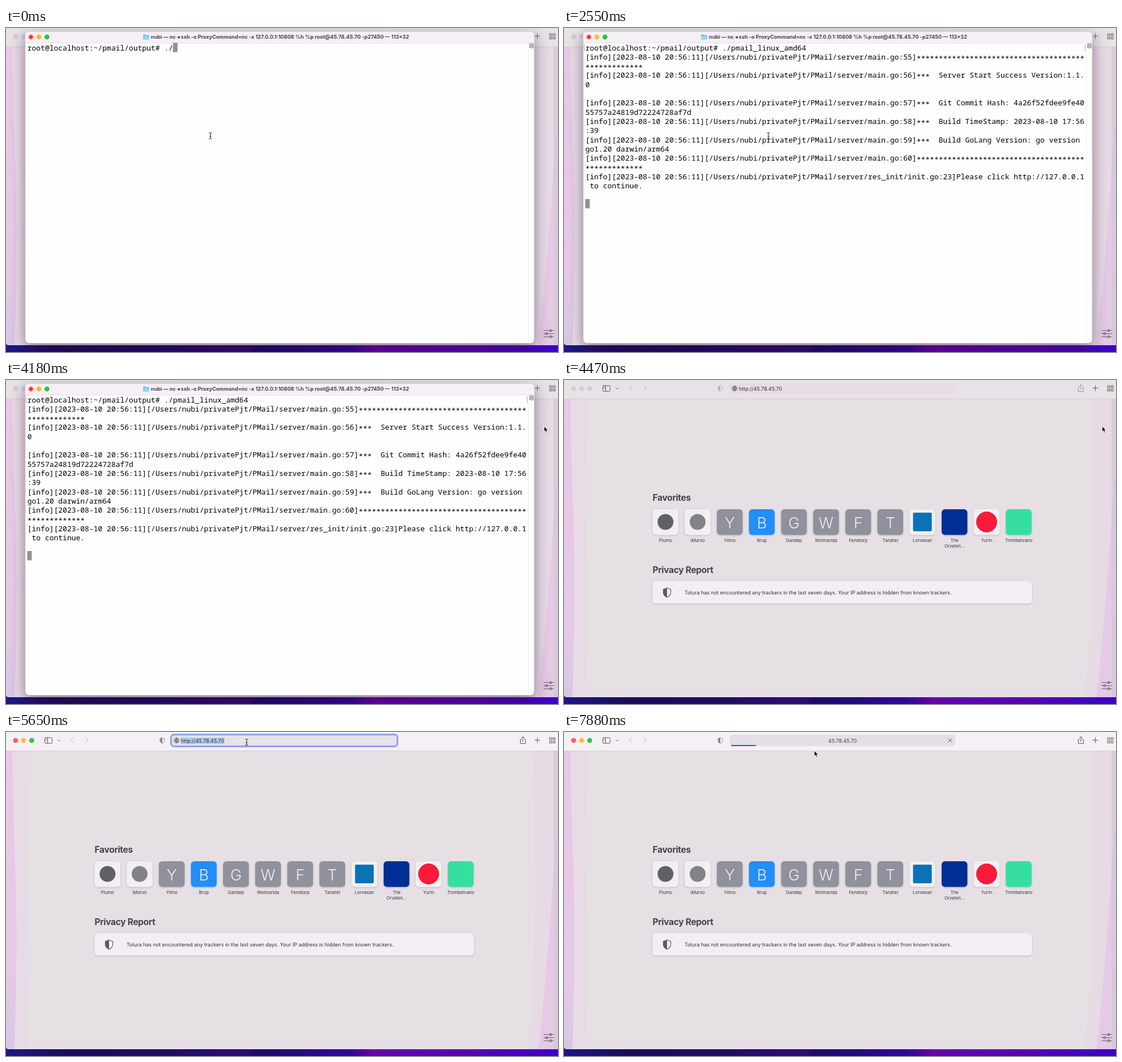
These frames come from a looping animation (975x574 px, 8000 ms). An HTML page:

```html
<!DOCTYPE html>
<html lang="en">
<head>
<meta charset="utf-8">
<style>
  html, body { margin: 0; width: 100%; height: 100%; overflow: hidden; }
  svg { display: block; width: 975px; height: 574px; font-family: Inter, sans-serif; }
  text { white-space: pre; }
  .mono { font: 13px "Noto Sans Mono", monospace; }
  .line { fill: none; stroke: #5c585d; stroke-linecap: round; stroke-linejoin: round; }
  .pale { stroke: #bcb5bc; }
  .heading { font-size: 15.5px; font-weight: 700; letter-spacing: -.3px; fill: #454147; }
  .inactive .light { fill: #d2cbd1; }
  .inactive .soft { opacity: .5; }
</style>
</head>
<body>
<svg viewBox="0 0 975 574">
  <defs>
    <linearGradient id="desk">
      <stop offset="0" stop-color="#1d1785"/><stop offset=".12" stop-color="#1a0b58"/>
      <stop offset=".44" stop-color="#2a0d72"/><stop offset=".45" stop-color="#1c0a66"/>
      <stop offset=".62" stop-color="#30069a"/><stop offset=".67" stop-color="#6402ac"/>
      <stop offset=".85" stop-color="#5602b4"/><stop offset="1" stop-color="#3c04c4"/>
    </linearGradient>
    <linearGradient id="pink" x2="0" y2="1">
      <stop offset="0" stop-color="#e8c8e6"/><stop offset=".75" stop-color="#e5c9e6"/>
      <stop offset="1" stop-color="#d8c6e6"/>
    </linearGradient>
    <filter id="deep" x="-10%" y="-10%" width="120%" height="125%">
      <feDropShadow dx="0" dy="8" stdDeviation="13" flood-color="#2a1030" flood-opacity=".48"/>
    </filter>
    <filter id="glow" x="-20%" y="-20%" width="140%" height="150%">
      <feDropShadow dx="0" dy="1" stdDeviation="1.8" flood-color="#604868" flood-opacity=".3"/>
    </filter>
    <clipPath id="page"><path d="M0 0H975V562H6Q0 562 0 556Z"/></clipPath>
    <path id="shield" d="M0-8 6.5-5.5V0Q6.5 5.5 0 8.5-6.5 5.5-6.5 0V-5.5Z"/>
  </defs>

  <rect width="975" height="574" fill="url(#desk)"/>
  <g id="browser">
    <g clip-path="url(#page)">
      <rect width="975" height="562" fill="#e6e0e5"/>
      <path d="M0 33H45Q37 150 41 300T38 562H0Z" fill="#e7dce6"/>
      <path d="M0 33H11Q13 150 17 260T15 562H0Z" fill="url(#pink)"/>
      <path d="M933 33H975V562H920Q937 400 935 250T933 33Z" fill="#e6dae4"/>
      <path d="M975 130Q964 300 956 400T940 562H975Z" fill="#e5cae6"/>
      <rect x="967" y="33" width="8" height="529" fill="#d5c7d8" opacity=".75"/>
      <rect id="toolbar" width="975" height="33"/>
      <path d="M0 33.5H975" stroke="#d3ccd3"/>
    </g>
    <g>
      <circle class="light" cx="17" cy="15" r="4.4" fill="#fe5f57"/>
      <circle class="light" cx="31" cy="15" r="4.4" fill="#febc2e"/>
      <circle class="light" cx="45.4" cy="15" r="4.4" fill="#28c840"/>
    </g>
    <g class="line">
      <path d="M70 10H80Q81.500 10 81.500 11.500V18.500Q81.500 20 80 20H70Q68.500 20 68.500 18.500V11.500Q68.500 10 70 10ZM73.500 10V20M70.500 12.500H71.500M70.500 14.500H71.500M91.500 14 93.500 16 95.500 14"/>
      <path class="pale" d="M119.500 10.500 115 15 119.500 19.500M140.500 10.500 145 15 140.500 19.500"/>
      <path class="soft" d="M910.500 13H908.500V20.500H917.500V13H915.500M913 17V8.500M910.500 10.500 913 8.300 915.500 10.500"/>
      <path d="M934 14.500H943M938.500 10V19M960.500 10H964V13.500H960.500ZM966.500 10H970V13.500H966.500ZM960.500 16H964V19.500H960.500ZM966.500 16H970V19.500H966.500Z"/>
    </g>
    <g class="soft" transform="translate(276 15) scale(.62)" fill="#8c878d">
      <use href="#shield" fill="none" stroke="#8c878d" stroke-width="1.400"/>
      <path d="M0-8V8.500Q-6.500 5.500-6.500 0V-5.500Z"/>
    </g>

    <rect id="bar" x="293" y="5" width="398" height="20" rx="5"/>
    <rect id="ring" x="291.500" y="4.500" width="400" height="21" rx="5.500" fill="#e7e1e8" stroke="#8aa4ef" stroke-width="3"/>
    <rect id="selection" x="309" y="10" width="77" height="11" fill="#a9cbee"/>
    <g id="address">
      <path class="line" style="stroke-width:.8" d="M297 15A4.300 4.300 0 0 1 305.600 15A4.300 4.300 0 0 1 297 15H305.600M301.300 10.700V19.300M301.300 10.700Q297 15 301.300 19.300Q305.600 15 301.300 10.700M298 12.700H304.600M298 17.300H304.600"/>
      <text x="309" y="18.500" font-size="9" fill="#353137">http://45.78.45.70</text>
    </g>
    <g id="loading">
      <text x="492" y="18.500" font-size="9" fill="#454146" text-anchor="middle">45.78.45.70</text>
      <path class="line" d="M679 12 685 18M685 12 679 18"/>
      <rect id="progress" x="295" y="23" height="2" rx="1" fill="#1664d8"/>
    </g>

    <text class="heading" x="156.500" y="214">Favorites</text>
    <g id="tiles"></g>
    <text class="heading" x="156.500" y="342">Privacy Report</text>
    <rect x="156.500" y="356.500" width="670" height="39.500" rx="6" fill="#f2eff2" filter="url(#glow)"/>
    <g transform="translate(182 376.500)" fill="#5e5a60">
      <use href="#shield" fill="none" stroke="#5e5a60" stroke-width="1.200"/>
      <path d="M0-8V8.500Q-6.500 5.500-6.500 0V-5.500Z"/>
    </g>
    <text x="213" y="380" font-size="9" fill="#343036">Tolura has not encountered any trackers in the last seven days. Your IP address is hidden from known trackers.</text>
    <g class="line" style="stroke-width:1.200" fill="#e6dae4">
      <path d="M950 536H967M950 541.500H967M950 547H967"/>
      <g style="fill:#e6d6e4"><circle cx="962" cy="536" r="1.700"/><circle cx="955" cy="541.500" r="1.700"/><circle cx="962" cy="547" r="1.700"/></g>
    </g>
  </g>

  <g id="terminal">
    <rect x="34" y="6.500" width="899" height="552" rx="7" fill="#fefefe" stroke="#a9a0aa" stroke-width=".5" filter="url(#deep)"/>
    <path d="M34 26.500V13.500Q34 6.500 41 6.500H926Q933 6.500 933 13.500V26.500Z" fill="#f5eff6"/>
    <path d="M34 26.500H933" stroke="#e2dce3"/>
    <path d="M922.500 27V558" stroke="#ececec"/>
    <path d="M925 28H931V35H925ZM926 30.500H930M926 32.500H930" fill="none" stroke="#555" stroke-width=".9"/>
    <circle cx="44" cy="16" r="4.400" fill="#fe5f57"/><circle cx="44" cy="16" r="1.400" fill="#7d1511"/>
    <circle cx="58" cy="16" r="4.400" fill="#febc2e"/><circle cx="72.300" cy="16" r="4.400" fill="#28c840"/>
    <path d="M242 12.500Q242 11.500 243 11.500H246L247 12.500H252Q253 12.500 253 13.500V20.500H242Z" fill="#6fc3ec"/>
    <path d="M242 14.500H253V20.500H242Z" fill="#92d6f6"/>
    <text x="256" y="19.300" font-size="9.100" font-weight="700" fill="#454046">nubi — nc ◂ ssh -o ProxyCommand=nc -x 127.0.0.1:10808 %h %p root@45.78.45.70 -p27450 — 113×32</text>
    <path id="marks" d="M36 29V41M920.500 29V41" stroke="#aaa"/>
    <rect id="caret" width="8" height="16.500" fill="#929292"/>
    <text id="prompt" class="mono" x="37.700" y="39.500"></text>
    <g id="log" class="mono"></g>
  </g>

  <g id="pointer">
    <path id="arrow" d="M0 0V9.800L2.300 7.800 4 11.600 5.700 10.800 4.100 7.200H7.100Z" stroke="#fff" stroke-width=".9"/>
    <path id="beam" d="M-2.500-5.500Q0-5.500 0-4Q0-5.500 2.500-5.500M0-4V4M-2.500 5.500Q0 5.500 0 4Q0 5.500 2.500 5.500M-1.500 1H1.500" fill="none" stroke="#222"/>
  </g>
</svg>
<script>
const $ = id => document.getElementById(id);
const set = (id, attrs) => { for (const k in attrs) $(id).setAttribute(k, attrs[k]); };
const show = (id, on) => { $(id).style.display = on ? '' : 'none'; };

const CELL = 7.8, ROW = 16.3, LOOP = 8000;
const PROMPT = 'root@localhost:~/pmail/output# ';

// Favourites: label, tile colour, then a letter or a plain mark
const GREY = '#90919d', PALE = '#f2eff2';
const favorites = [
  ['Plumo', PALE, '●', '#626064'], ['iMurvo', PALE, '●', '#858287'],
  ['Yilmo', GREY, 'Y'], ['Brup', '#238ef6', 'B'], ['Gandep', GREY, 'G'],
  ['Wolmarida', GREY, 'W'], ['Fendlorp', GREY, 'F'], ['Tandrel', GREY, 'T'],
  ['Lorvexan', PALE, '■', '#0a72b5'], ['The|Orvelen...', '#032d97'],
  ['Yurm', PALE, '●', '#f91b3c'], ['Trombelvano', '#35dfa0']
];
$('tiles').innerHTML = favorites.map(([label, color, sign, ink], i) => {
  const x = 179.3 + 56.72 * i;
  const mark = sign === '●' ? `<circle cx="${x}" cy="251.500" r="${ink === '#f91b3c' ? 18.5 : 14}" fill="${ink}"/>`
    : sign === '■' ? `<rect x="${x - 16.5}" y="235" width="33" height="33" rx="2" fill="${ink}"/>`
    : sign ? `<text x="${x}" y="263" font-size="27" font-weight="300" fill="#f0edf1" text-anchor="middle">${sign}</text>` : '';
  const lines = label.split('|').map((s, n) =>
    `<text x="${x}" y="${287 + 10 * n}" font-size="7.800" fill="#3a363b" text-anchor="middle">${s}</text>`).join('');
  return `<rect x="${x - 22.8}" y="229" width="45.500" height="45.500" rx="6" fill="${color}" filter="url(#glow)"/>${mark}${lines}`;
}).join('');

// Terminal output, wrapped at 113 columns
const info = (file, msg) => `[info][2023-08-10 20:56:11][/Users/nubi/privatePjt/PMail/server/${file}]${msg}`;
const stars = '*'.repeat(51);
const output = [
  info('main.go:55', stars),
  info('main.go:56', '***  Server Start Success Version:1.1.0'), '',
  info('main.go:57', '***  Git Commit Hash: 4a26f52fdee9fe4055757a24819d72224728af7d'),
  info('main.go:58', '***  Build TimeStamp: 2023-08-10 17:56:39'),
  info('main.go:59', '***  Build GoLang Version: go version go1.20 darwin/arm64'),
  info('main.go:60', stars),
  info('res_init/init.go:23', 'Please click http://127.0.0.1 to continue.')
];
$('log').innerHTML = output.flatMap(s => s.match(/.{1,113}/g) || ['']).map((s, i) =>
  `<text x="37.700" y="${39.5 + ROW * (i + 1)}">${
    s.replace('version go1', 'version go1').replace(/\*+/g, m => `<tspan baseline-shift="-2.500">${m}</tspan>`)}</text>`).join('');

// Progress 0..1 from a to b, advancing in n visible steps
const stepped = (t, a, b, n) =>
  t < a ? 0 : Math.min(1, (Math.floor((t - a) / ((b - a) / (n - 1)) + .01) + 1) / n);
const ease = u => u * u * (3 - 2 * u);
const curve = (u, a, b, c) => (1 - u) * (1 - u) * a + 2 * u * (1 - u) * b + u * u * c;

function pointer(t) {
  if (t < 4470) {
    const u = ease(stepped(t, 3290, 4180, 7));
    return [curve(u, 361, 640, 950.5), curve(u, 191, 296, 82)];
  }
  if (t < 7290) {
    const u = ease(stepped(t, 4620, 5500, 7));
    return [curve(u, 950.5, 640, 425), curve(u, 82, 70, 18)];
  }
  const u = stepped(t, 7290, 7880, 5);
  return [425 + 17 * u, 18 + 15 * u];
}

function render(t) {
  const web = t >= 4470, active = t >= 5500, focus = t >= 5650 && t < 6690, loading = t >= 6540;
  const typed = t < 150 ? './' : t < 1050 ? './p' : t < 1200 ? './pm' : t < 1500 ? './pma' : './pmail_linux_amd64 ';
  const started = t >= 2550;

  show('terminal', !web);
  show('marks', t >= 1050);
  show('log', started);
  $('prompt').textContent = PROMPT + typed;
  set('caret', started ? { x: 37.5, y: 303 }
    : { x: 37.5 + CELL * (PROMPT + typed).length, y: 26.3 });

  $('browser').setAttribute('class', active ? '' : 'inactive');
  set('toolbar', { fill: active ? '#f5f0f4' : '#e8e2e7' });
  set('bar', { fill: active ? '#e5dfe5' : '#e7dbe6' });
  show('ring', focus);
  set('ring', { 'stroke-opacity': loading ? .4 : 1 });
  show('selection', focus && !loading);
  show('address', !loading);
  show('loading', loading);
  set('progress', { width: 41 * stepped(t, 6540, 6990, 4) + 3 * stepped(t, 7290, 7880, 5) });

  const [x, y] = pointer(t);
  const beam = web ? active && t < 6840 : x < 933;
  set('pointer', { transform: `translate(${x} ${y})` });
  show('beam', beam);
  show('arrow', !beam);
}

(function tick() {
  render(performance.now() % LOOP);
  requestAnimationFrame(tick);
})();
</script>
</body>
</html>
```
